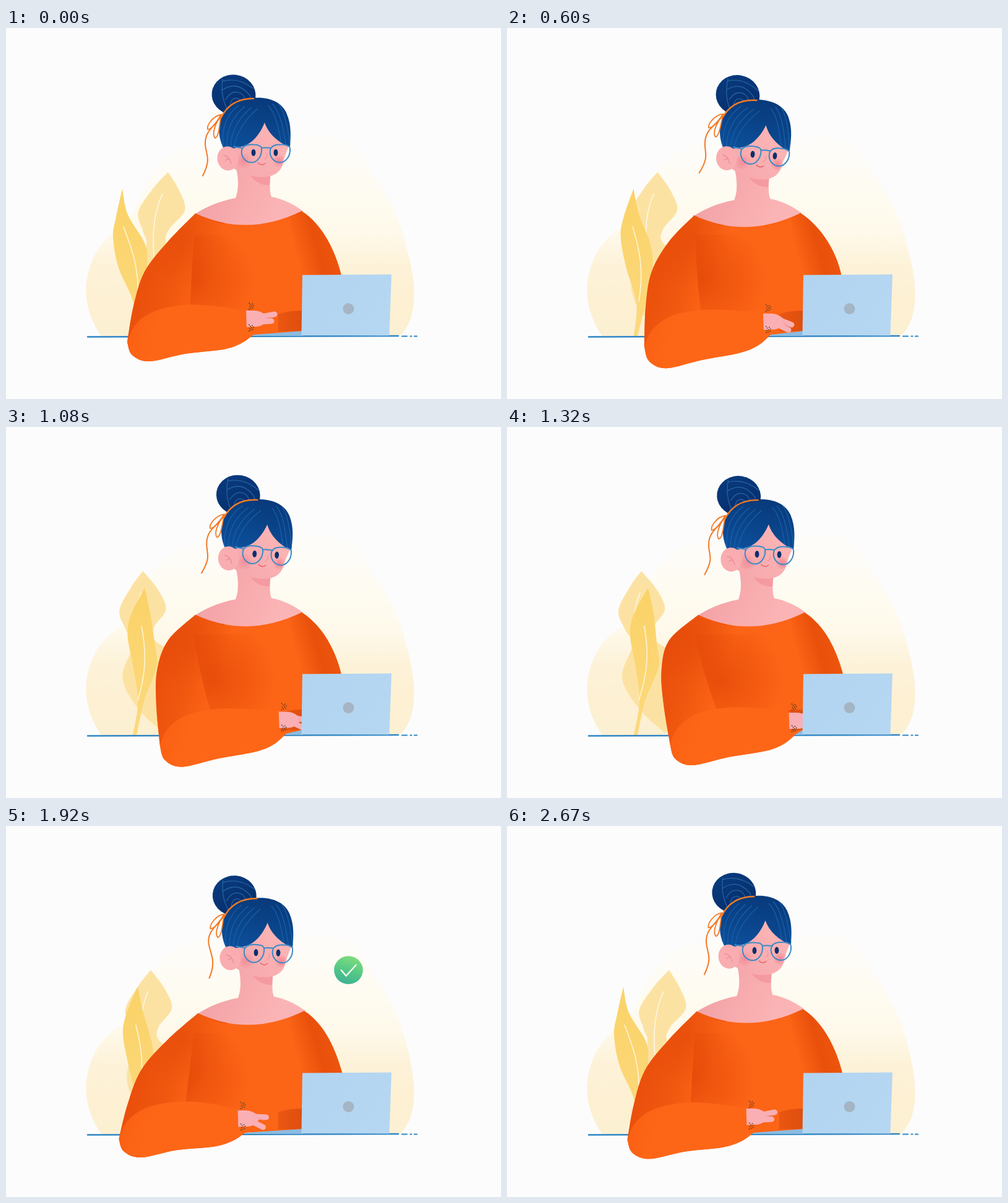
Recreate the animation shown at these times as an HTML page with a canvas. Size 800 by 600 pixels, loop 2.7 s.

```html
<!DOCTYPE html>
<html lang="en">
<head>
<meta charset="utf-8">
<title>Working at the laptop</title>
<style>
  html, body { margin: 0; width: 100%; height: 100%; overflow: hidden; background: #fcfcfc; }
  canvas { display: block; }
</style>
</head>
<body>
<canvas id="stage" width="800" height="600"></canvas>
<script>
const ctx = document.getElementById('stage').getContext('2d');
const LOOP = 2700, STEP = 30;
const TIMES = [0, 330, 840, 1320, 1920, 2310];

const TRACKS = {
  headX: [0, -4, -1.5, 4, 4, 0],
  headY: [0, 2.5, 5, 4.5, 3.5, -2.5],
  headTilt: [0, 2.5, 5, 1, 0.8, -8.5],
  bunX: [0, 2, 0, 1, -4, -12],
  bunY: [0, 0, 0, 0, 2, 9],
  tailX: [318, 316, 316, 316, 325, 344],
  tailY: [239, 238, 238, 236, 244, 256],
  bodyX: [0, -4, -3, 3, 4, 4],
  bodyY: [0, 2.5, 3.5, 4, 3, 0],
  arm: [0, 18.5, 33, 67.5, -13.5, -14.5],
  elbowY: [0, 9, 12, 8, -3, -7],
  handY: [0, 8, 2, 5, 3, 3],
  finger1Y: [6, 21, 15, 13, 11, 5],
  finger2Y: [17, 25, 27, 26, 27, 29]
};

// Periodic cubic through the keys, flat at each extreme
function track(keys, t) {
  const n = keys.length;
  const time = i => TIMES[(i + n) % n] + Math.floor(i / n) * LOOP;
  const value = i => keys[(i + n) % n];
  const slope = i => (value(i + 1) - value(i)) / (time(i + 1) - time(i));
  const tangent = i => {
    const a = slope(i - 1), b = slope(i);
    return a * b <= 0 ? 0 : 2 * a * b / (a + b);
  };
  let i = n - 1;
  while (TIMES[i] > t) i--;
  const span = time(i + 1) - time(i), u = (t - time(i)) / span;
  const rise = u * u * (3 - 2 * u);
  return value(i) * (1 - rise) + value(i + 1) * rise
    + span * (tangent(i) * u * (1 - u) * (1 - u) - tangent(i + 1) * u * u * (1 - u));
}

const clamp = v => Math.max(0, Math.min(1, v));
const easeOut = v => 1 - (1 - v) * (1 - v);

function gradient(x0, y0, x1, y1, ...colors) {
  const g = ctx.createLinearGradient(x0, y0, x1, y1);
  colors.forEach((c, i) => g.addColorStop(i / (colors.length - 1), c));
  return g;
}

function fill(path, color) {
  ctx.fillStyle = color;
  ctx.fill(typeof path === 'string' ? new Path2D(path) : path);
}

function stroke(path, color, width) {
  ctx.strokeStyle = color;
  ctx.lineWidth = width;
  ctx.lineCap = ctx.lineJoin = 'round';
  ctx.stroke(typeof path === 'string' ? new Path2D(path) : path);
}

function oval(x, y, rx, ry, color, turn = 0) {
  ctx.beginPath();
  ctx.ellipse(x, y, rx, ry, turn, 0, Math.PI * 2);
  ctx.fillStyle = color;
  ctx.fill();
}

function glow(x, y, r, rgb, alpha) {
  const g = ctx.createRadialGradient(x, y, 0, x, y, r);
  g.addColorStop(0, `rgba(${rgb},${alpha})`);
  g.addColorStop(1, `rgba(${rgb},0)`);
  oval(x, y, r, r, g);
}

// Smooth curve from the current point (the first one) through the rest
function through(path, pts) {
  const at = i => pts[Math.max(0, Math.min(pts.length - 1, i))];
  for (let i = 0; i < pts.length - 1; i++) {
    const [a, b, c, d] = [at(i - 1), at(i), at(i + 1), at(i + 2)];
    path.bezierCurveTo(b[0] + (c[0] - a[0]) / 6, b[1] + (c[1] - a[1]) / 6,
      c[0] - (d[0] - b[0]) / 6, c[1] - (d[1] - b[1]) / 6, c[0], c[1]);
  }
}

function drawBackdrop() {
  ctx.fillStyle = '#fcfcfc';
  ctx.fillRect(0, 0, 800, 600);
  fill('M154 498 C136 473 125 438 131 405 C138 365 160 335 190 321 C208 308 214 262 250 220 C282 186 322 184 365 180 L470 178 C510 172 550 165 574 208 C590 238 625 276 642 335 C652 370 662 408 659 443 C657 470 648 488 636 498 Z',
    gradient(0, 165, 0, 498, '#fcfcfb', '#fefcf6', '#fefbf0', '#fef9ea', '#fdf2d8', '#fdf0d3', '#fcf0d2'));
}

function drawLeaves(t) {
  const k = -Math.cos(2 * Math.PI * t / LOOP);
  const tip = 239.5 - 22.5 * k;
  const side = (x, amount) => x - amount * k;

  const broad = new Path2D();
  broad.moveTo(tip, 233);
  through(broad, [[tip, 233], [side(219, 20), 258], [side(197, 17), 297], [side(206, 15), 328],
    [side(215, 12), 352], [side(198, 12), 405], [213, 455], [254, 494]]);
  broad.lineTo(290, 494);
  broad.lineTo(285, 370);
  through(broad, [[285, 370], [side(250, 9), 347], [side(250, 14), 325], [side(272, 17), 295],
    [side(261, 19), 263], [tip, 233]]);
  fill(broad, '#fce2a2');
  stroke(`M${side(234, 19)} 268 Q${side(216, 18)} 308 ${side(224, 15)} 370`, '#fff9e8', 1.5);

  const tip2 = 208 + 20 * k, left = 186 + 13 * k, right = 236.5 + 8.5 * k;
  const narrow = new Path2D();
  narrow.moveTo(tip2, 260);
  through(narrow, [[tip2, 260], [left + 5, 305], [left, 338], [left + 9, 388], [210 + 4 * k, 445], [205, 498]]);
  narrow.lineTo(211, 498);
  through(narrow, [[211, 498], [225 - k, 440], [right, 388], [right - 3, 350], [tip2 + 9, 302], [tip2, 260]]);
  fill(narrow, gradient(0, 260, 0, 498, '#fad267', '#fcd97e'));
  stroke(`M${206 + 16 * k} 322 C${216 + 12 * k} 358 ${223 + 7 * k} 390 213 442`, '#fff3cf', 1.7);
}

function drawDesk() {
  stroke('M132 499.5 L634 498', '#2f86c4', 2.4);
  stroke('M640 498.5 L648 498.5 M653.5 498.5 L655.5 498.5 M660 498.5 L664 498.5', '#2f86c4', 2.2);
}

function drawNeck(p) {
  ctx.save();
  ctx.translate(p.bodyX, p.bodyY);
  const shape = 'M370 218 C377 245 376 262 371 275 C344 280 322 290 305 301 Q385 343 480 296 C462 283 445 276 429 273 C425 263 427 250 427 232 Z';
  fill(shape, gradient(335, 250, 440, 300, '#f2a3a7', '#f8acae', '#fbb4b5'));
  fill('M395 236 L428 236 L426 254 Q408 255 396 240 Z', 'rgba(240,128,142,.45)');
  ctx.restore();
}

function armPoints(p) {
  const { arm: a, elbowY: e } = p;
  return {
    outer: [[306 + p.bodyX, 300 + p.bodyY], [262, 345], [224 + .38 * a, 394],
      [206 + .7 * a, 450], [196 + a, 508 + e * .6]],
    under: [[196 + a, 508 + e * .6], [204 + a, 529 + e * .9], [232 + a, 539 + e], [289 + a, 527 + e * .9],
      [350 + a, 520 + e * .5], [380 + a, 510 + e * .3], [400 + a, 496]]
  };
}

function drawTorso(p) {
  const { arm: a, bodyX: x, bodyY: y } = p;
  const pts = armPoints(p);
  const torso = new Path2D();
  torso.moveTo(306 + x, 300 + y);
  through(torso, pts.outer);
  through(torso, pts.under);
  torso.lineTo(478, 490);
  torso.lineTo(542, 490);
  torso.lineTo(542 + x * .4, 400);
  torso.bezierCurveTo(533, 362, 512 + x, 318 + y, 478 + x, 296 + y);
  torso.quadraticCurveTo(390 + x, 339 + y, 306 + x, 300 + y);

  fill('M365 498 L480 488 L480 498 Z', '#8bbbe0');
  fill(torso, '#fc6416');

  ctx.save();
  ctx.clip(torso);
  const edge = 225 + .4 * a;
  fill('M160 290 H520 V560 H160 Z', gradient(edge, 375, edge + 100, 405, 'rgba(224,68,6,.65)', 'rgba(224,70,6,.45)', 'rgba(230,75,8,0)'));
  glow(290, 345, 75, '222,68,5', .35);

  const foldX = 297 + .65 * a;
  ctx.save();
  ctx.clip(new Path2D(`M304 335 Q${300 + .2 * a} 390 ${foldX} 462 H480 V335 Z`));
  glow(foldX + 4, 408, 100, '220,64,3', .6);
  ctx.restore();

  fill('M455 285 H560 V460 H478 Z', gradient(468, 365, 538, 345, 'rgba(214,60,0,0)', 'rgba(214,60,0,.5)', 'rgba(225,72,8,.5)'));
  fill('M440 463 Q455 457 480 457 L480 490 L440 491 Z', gradient(438, 0, 480, 0, '#ec5712', '#dd4e0e'));
  ctx.restore();
  stroke(`M${306 + x} ${301 + y} Q${330 + x} ${312 + y} ${352 + x} ${316 + y}`, '#f2580f', 2);
}

function drawHand(p) {
  const x = 387 + p.arm, y = 457 + p.handY;
  ctx.save();
  ctx.translate(x, y);
  const skin = '#f9afb4';
  stroke(`M26 10 L47 ${p.finger1Y}`, skin, 9);
  stroke(`M24 18 L42 ${p.finger2Y}`, skin, 9);
  fill('M-8 0 L15 0 C25 1 33 5 36 13 C32 22 24 26 17 26 L-8 27 Z', skin);
  stroke(`M33 12 L43 ${p.finger1Y + 5}`, '#ee949e', 1);
  ctx.restore();
}

function drawSleeve(p) {
  const { arm: a, elbowY: e } = p;
  const lift = p.handY * .6;
  const under = armPoints(p).under;
  const start = under[0];
  const sleeve = new Path2D();
  sleeve.moveTo(...start);
  through(sleeve, under);
  sleeve.lineTo(389 + a, 488 + lift);
  sleeve.lineTo(388 + a, 457 + lift);
  through(sleeve, [[388 + a, 457 + lift], [340 + a, 450 + e * .6], [290 + a, 448 + e * .7],
    [240 + a, 458 + e * .7], [209 + a, 480 + e * .7], start]);
  fill(sleeve, gradient(200 + a, 470, 300 + a, 500, '#fa6013', '#fd6617', '#fd6617'));

  // Beaded ends of the cuff
  for (const base of [450, 485]) {
    for (let i = 0; i < 9; i++) {
      oval(393 + a + (i * 5 % 8), base + lift - 5 + i * 1.25, .9, .9, i % 3 ? '#5b3514' : '#30483b');
    }
  }
}

function drawLaptop() {
  fill('M479 399.5 L623 398.5 L619.5 497.5 L477.5 497 Z', gradient(480, 400, 620, 497, '#b2d4f0', '#b6d7f2'));
  oval(553.5, 454, 9, 9, '#a5b5c3');
}

function drawBun(p) {
  ctx.save();
  ctx.translate(368 + p.bunX, 108 + p.bunY);
  ctx.rotate(p.bunX * .012);
  oval(0, 0, 35.5, 32.5, gradient(-20, -30, 15, 35, '#093a7d', '#062d6b'), .12);
  stroke('M-18 -25 Q-22 5 -8 28 M-18 -22 Q8 -29 32 -10 M-18 -8 Q6 -24 26 1 Q29 10 27 17 M-13 8 Q-3 -10 12 -2 Q20 4 19 16 M-6 18 Q-4 3 7 6 Q13 9 12 18', '#24629f', 1.3);
  ctx.restore();
}

function drawRibbon(p) {
  const orange = '#f47a25';
  const sway = p.tailX - 318;
  stroke('M348 140 C334 142 324 158 326 164 C332 164 344 150 348 140 M348 140 C338 155 332 172 338 178 C345 176 345 152 348 140', orange, 1.8);
  stroke(`M347 141 C338 160 322 165 ${322 + sway * .15} 186 C${322 + sway * .5} 205 ${333 + sway * .6} ${p.tailY - 30} ${p.tailX} ${p.tailY}`, orange, 2);
}

function lens(cx) {
  stroke(`M${cx - 16} 197 C${cx - 14} 190 ${cx - 7} 188.5 ${cx} 188.5 C${cx + 9} 188.5 ${cx + 16} 190 ${cx + 16} 195 C${cx + 17} 207 ${cx + 9} 217.5 ${cx} 217.5 C${cx - 10} 217.5 ${cx - 18} 208 ${cx - 16} 197 Z`, '#3b8ac8', 2);
}

function drawHead(p) {
  ctx.save();
  ctx.translate(420 + p.headX, 203 + p.headY);
  ctx.rotate(p.headTilt * Math.PI / 180);
  ctx.translate(-420, -203);

  drawBun(p);
  fill('M362 188 L366 226 C375 231 390 241 414 241 C437 241 447 229 448 215 L458 188 L418 148 Z',
    gradient(375, 235, 440, 190, '#f6a8ac', '#fbb3b4'));
  glow(384, 215, 14, '238,112,130', .5);
  glow(441, 215, 11, '238,100,122', .6);

  const hair = new Path2D('M352 195 C338 168 341 130 380 117 C405 109 441 111 453 137 C462 157 460 176 459 193 C440 185 424 171 418 153 C409 175 395 191 374 193 C366 196 358 196 352 195 Z');
  fill(hair, gradient(400, 112, 385, 196, '#083a7b', '#0a448a', '#0c4f9b'));
  ctx.save();
  ctx.clip(hair);
  for (let i = 0; i < 4; i++) {
    stroke(`M${376 + i * 10} ${125 + i * 2} Q${346 + i * 9} ${148 + i * 4} ${351 + i * 6} 193`, '#1961a8', 1.2);
  }
  for (let i = 0; i < 3; i++) {
    stroke(`M${424 + i * 7} ${126 - i * 3} Q${438 + i * 7} ${140 - i * 3} ${445 + i * 7} 188`, '#1961a8', 1.2);
  }
  ctx.restore();
  stroke('M347 146 Q362 114 400 114', '#f57a22', 2.4);
  drawRibbon(p);

  oval(358.5, 211, 17, 19.5, '#f9adb0', -.1);
  stroke('M352 206 Q361 207 364 219 M355 214 Q359 211 361 212', '#ed8d9a', 1.4);

  oval(400, 201.5, 3.4, 5.6, '#0b2f6c');
  oval(436, 201.5, 3.4, 5.6, '#0b2f6c');
  stroke('M421 203 Q424 209 418 212', '#f0929c', 1.3);
  stroke('M407 218 Q413 224 419 219', '#e4636f', 1.4);
  lens(397);
  lens(443);
  stroke('M413 194 Q420 193 427 194 M381 194 L368 192', '#3b8ac8', 2);
  ctx.restore();
}

function drawBadge(t) {
  const rise = easeOut(clamp((t - 1780) / 420));
  const leave = clamp((t - 2430) / 180);
  const size = rise * (1 - leave * leave);
  if (size <= 0) return;
  ctx.save();
  ctx.translate(553.5, 300 - 120.5 * rise);
  ctx.scale(size, size);
  oval(0, 0, 42, 41, gradient(12, -40, -12, 40, '#7fdc7d', '#57c985', '#3db292'));
  const shine = clamp((t - 2130) / 180);
  if (shine > 0) {
    ctx.beginPath();
    ctx.arc(0, 0, 36, -1.4, -1.4 + 1.8 * shine);
    ctx.strokeStyle = 'rgba(48,166,174,.75)';
    ctx.lineWidth = 3.5;
    ctx.stroke();
  }
  stroke('M-21 0 L-7 17 L22 -15', '#ffffff', 4);
  ctx.restore();
}

function draw(t) {
  const p = {};
  for (const name in TRACKS) p[name] = track(TRACKS[name], t);
  drawBackdrop();
  drawLeaves(t);
  drawDesk();
  drawNeck(p);
  drawTorso(p);
  drawHand(p);
  drawSleeve(p);
  drawLaptop();
  drawHead(p);
  drawBadge(t);
}

const begin = performance.now();
function frame() {
  const t = (performance.now() - begin) % LOOP;
  draw(Math.floor(t / STEP) * STEP);
  requestAnimationFrame(frame);
}
frame();
</script>
</body>
</html>
```
